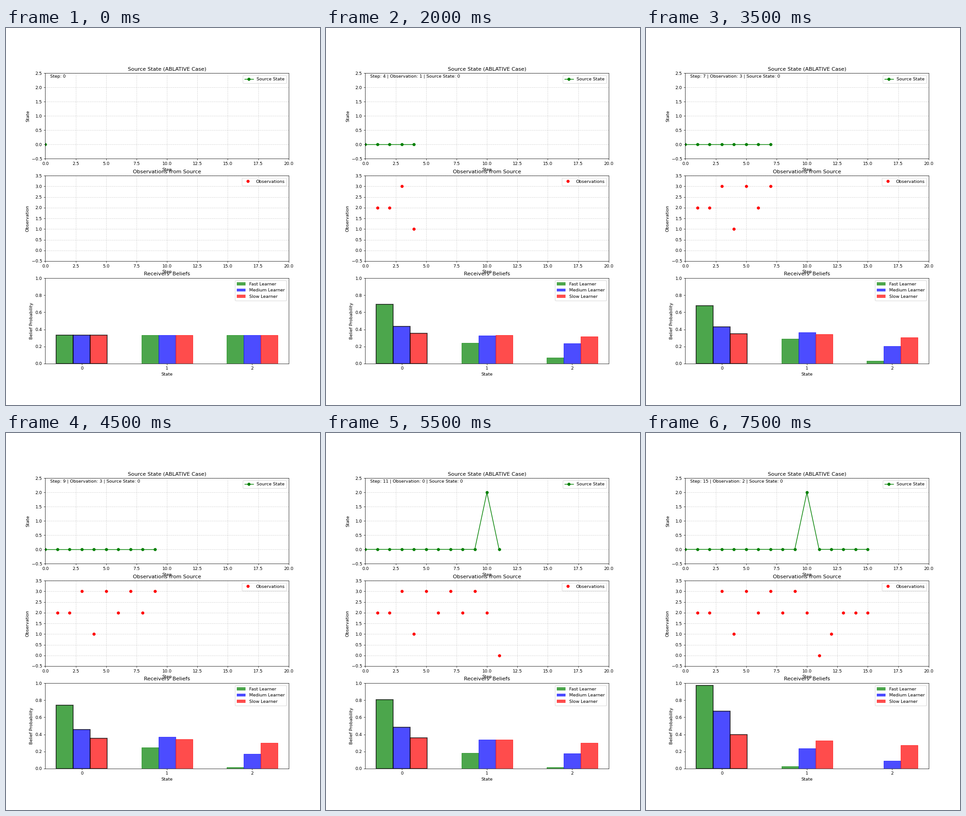
A matplotlib script that plays this animation: 683 px wide and 820 px high, repeating every 8 s.

```python
import numpy as np
import matplotlib.pyplot as plt
from matplotlib.animation import FuncAnimation

W, H = 683, 820
DPI = H / 12
EPS = 1e-6  # keeps float rounding from dropping a pixel

STEPS = 16
OBS = [2, 2, 3, 1, 3, 2, 3, 2, 3, 2, 0, 1, 2, 2, 2]
SOURCE = [2 if k == 10 else 0 for k in range(STEPS)]

# Rows: states, columns: P(observation | state)
LIKELIHOOD = np.array([
    [0.100, 0.200, 0.4000, 0.300],
    [0.155, 0.176, 0.1725, 0.500],
    [0.377, 0.138, 0.0950, 0.388],
])

# name, colour, constant added to the likelihood (larger = slower learning)
LEARNERS = [
    ("Fast Learner", "green", 0.05),
    ("Medium Learner", "blue", 0.75),
    ("Slow Learner", "red", 5.0),
]
BAR_W = 0.2


def belief_history(floor):
    belief = np.full(3, 1 / 3)
    history = [belief]
    for obs in OBS:
        belief = belief * (LIKELIHOOD[:, obs] + floor)
        belief = belief / belief.sum()
        history.append(belief)
    return history


BELIEFS = [belief_history(floor) for _, _, floor in LEARNERS]

plt.rcParams["font.family"] = "DejaVu Sans"
fig, (ax_src, ax_obs, ax_bel) = plt.subplots(
    3, 1, figsize=((W + EPS) / DPI, (H + EPS) / DPI), dpi=DPI)


def setup_track(ax, title, ylabel, ymax):
    ax.set_xlim(0, 20)
    ax.set_ylim(-0.5, ymax)
    ax.set_title(title)
    ax.set_xlabel("Step")
    ax.set_ylabel(ylabel)
    ax.grid(True, linestyle="--", alpha=0.6)
    ax.legend(loc="upper right")


src_line, = ax_src.plot([], [], "go-", label="Source State")
setup_track(ax_src, "Source State (ABLATIVE Case)", "State", 2.5)
info = ax_src.text(0.02, 0.95, "", transform=ax_src.transAxes)

obs_dots, = ax_obs.plot([], [], "ro", label="Observations")
setup_track(ax_obs, "Observations from Source", "Observation", 3.5)

states = np.arange(3)
bars = [
    ax_bel.bar(states + (i - 1) * BAR_W, BELIEFS[i][0], BAR_W,
               color=color, alpha=0.7, label=name)
    for i, (name, color, _) in enumerate(LEARNERS)
]
ax_bel.set_ylim(0, 1)
ax_bel.set_xticks(states)
ax_bel.set_title("Receivers' Beliefs")
ax_bel.set_xlabel("State")
ax_bel.set_ylabel("Belief Probability")
ax_bel.legend(loc="upper right")


def update(step):
    src_line.set_data(range(step + 1), SOURCE[:step + 1])
    obs_dots.set_data(range(1, step + 1), OBS[:step])

    label = f"Step: {step}"
    if step:
        label += f" | Observation: {OBS[step - 1]} | Source State: {SOURCE[step]}"
    info.set_text(label)

    for group, history, (_, color, _) in zip(bars, BELIEFS, LEARNERS):
        for state, (bar, p) in enumerate(zip(group, history[step])):
            active = state == SOURCE[step]
            bar.set_height(p)
            bar.set_edgecolor("black" if active else color)
            bar.set_linewidth(2 if active else 1)
    return [src_line, obs_dots, info, *(b for g in bars for b in g)]


anim = FuncAnimation(fig, update, frames=STEPS, interval=500, repeat=True)
plt.show()
```
